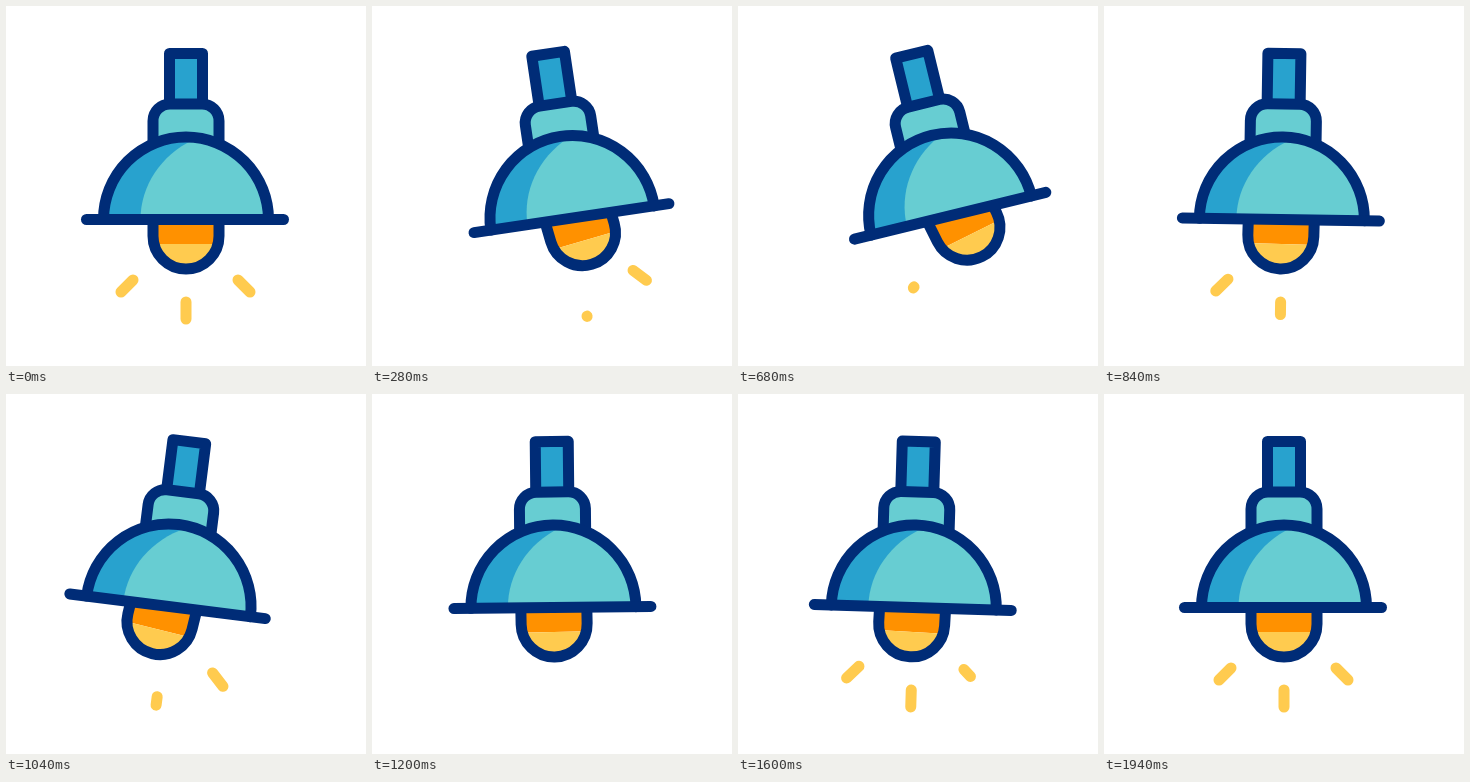
Animation of 360x360 px, one loop 2.4 s. Source, as an HTML page:

```html
<!DOCTYPE html>
<html lang="en">
<head>
<meta charset="utf-8">
<title>Swinging lamp</title>
<style>
  html, body { margin: 0; width: 100%; height: 100%; overflow: hidden; background: #fff; }
  svg { display: block; width: 100vw; height: 100vh; }
  .line { stroke: #002c77; stroke-width: 11; stroke-linecap: round; stroke-linejoin: round; }
  .ray { stroke: #ffcb4f; stroke-width: 11; stroke-linecap: round; }
</style>
</head>
<body>
<svg viewBox="0 0 360 360" fill="none">
  <defs>
    <clipPath id="glass"><path d="M147 180V230A33 33 0 0 0 213 230V180Z"/></clipPath>
  </defs>
  <g id="lamp">
    <line class="ray"/>
    <line class="ray"/>
    <line class="ray"/>
    <g id="bulb">
      <g clip-path="url(#glass)">
        <path fill="#ff9100" d="M140 180H220V238H140Z"/>
        <path fill="#ffcb4f" d="M140 238H220V270H140Z"/>
      </g>
      <path class="line" d="M147 195V230A33 33 0 0 0 213 230V195"/>
    </g>
    <path class="line" fill="#28a2ce" d="M163.5 98V47.5H196.5V98"/>
    <path class="line" fill="#67cdd2" d="M147 140V115A17 17 0 0 1 164 98H196A17 17 0 0 1 213 115V140"/>
    <path fill="#28a2ce" d="M97.5 213.5A82.5 82.5 0 0 1 262.5 213.5Z"/>
    <path fill="#67cdd2" d="M134.5 213.5C134.5 180 155 149 187 134A82.5 82.5 0 0 1 262.5 213.5Z"/>
    <path class="line" d="M97.5 213.5A82.5 82.5 0 0 1 262.5 213.5"/>
    <path class="line" d="M80.5 213.5H277.5"/>
  </g>
</svg>
<script>
  const LOOP = 2400, STEP = 20;

  // [time in ms, lamp angle in degrees]
  const swing = [[0, 0], [580, -17.8], [980, 8.2], [1320, -4.1], [1640, 2], [1940, 0], [LOOP, 0]];

  // Inner and outer end of each ray, left to right
  const rays = [[127, 274, 115, 286], [180, 296, 180, 313], [232, 274, 244, 286]];
  const hideAt = [70, 880], showAt = [660, 1335];
  const STAGGER = 100, TRIM = 120;

  const lamp = document.getElementById('lamp');
  const bulb = document.getElementById('bulb');
  const lines = document.querySelectorAll('.ray');

  const ease = (t, from, to) => {
    const p = Math.min(1, Math.max(0, (t - from) / (to - from)));
    return p * p * (3 - 2 * p);
  };

  function angleAt(t) {
    const i = swing.findIndex(k => k[0] > t);
    const [t0, a0] = swing[i - 1], [t1, a1] = swing[i];
    return a0 + (a1 - a0) * ease(t, t0, t1);
  }

  // Rays shrink towards the outer end, then grow from the inner end.
  function drawRay(line, i, t) {
    const trim = start => ease(t, start + i * STAGGER, start + i * STAGGER + TRIM);
    const round = t < showAt[0] + i * STAGGER ? 0 : trim(hideAt[1]) === 0 || t < showAt[1] + i * STAGGER ? 1 : 2;
    const from = round < 2 ? trim(hideAt[round]) : 0;
    const to = round > 0 ? trim(showAt[round - 1]) : 1;
    const [x1, y1, x2, y2] = rays[i];
    const set = (name, a, b, p) => line.setAttribute(name, a + (b - a) * p);
    set('x1', x1, x2, from);
    set('y1', y1, y2, from);
    set('x2', x1, x2, to);
    set('y2', y1, y2, to);
    line.style.display = to - from > 0.001 ? '' : 'none';
  }

  function draw(t) {
    const angle = angleAt(t);
    lamp.setAttribute('transform', `rotate(${angle} 180 74)`);
    bulb.setAttribute('transform', `rotate(${angle * 0.93} 180 173)`);
    lines.forEach((line, i) => drawRay(line, i, t));
  }

  const start = performance.now();
  function tick() {
    const t = (performance.now() - start) % LOOP;
    draw(Math.floor(t / STEP) * STEP);
    requestAnimationFrame(tick);
  }
  tick();
</script>
</body>
</html>
```
